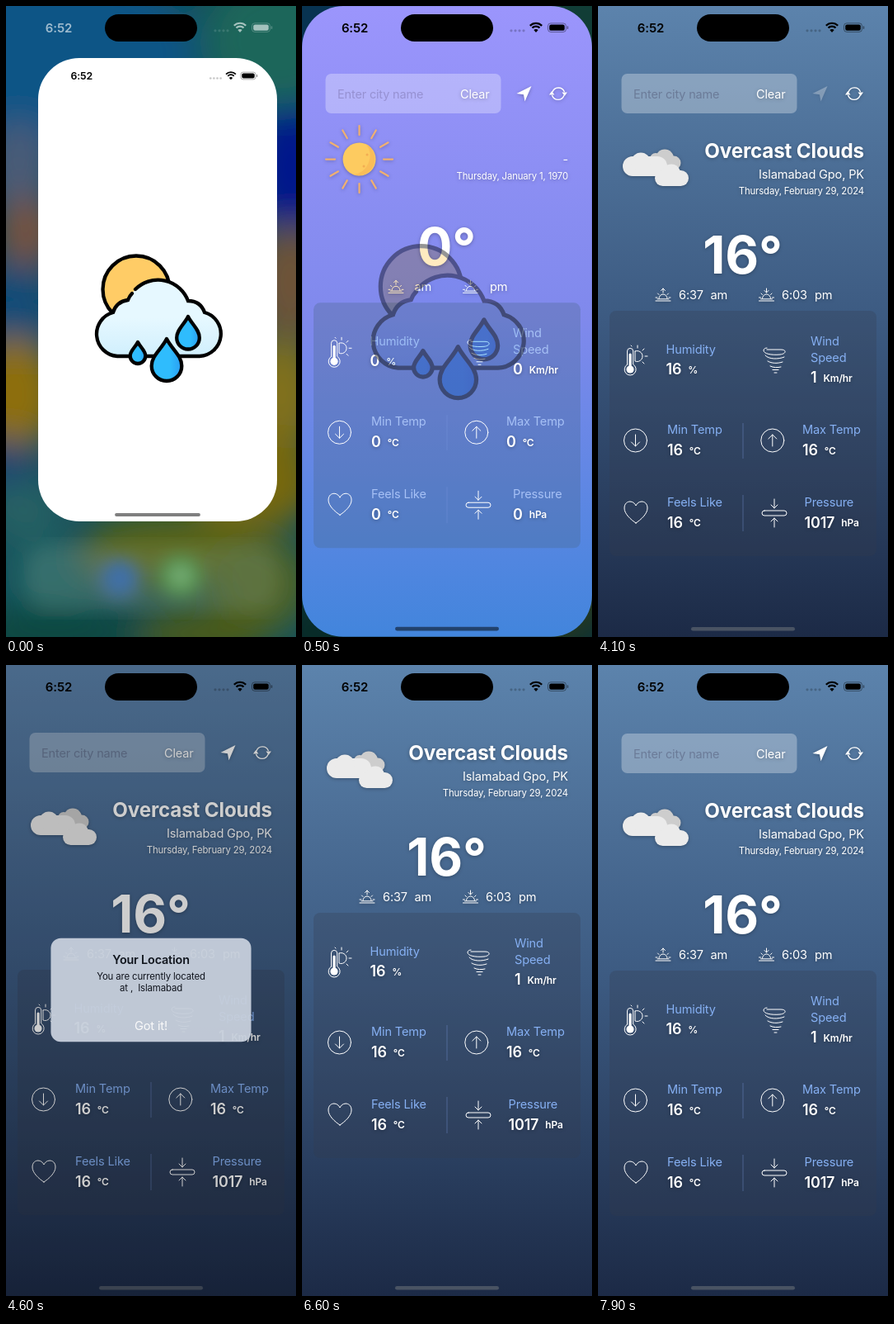
An HTML page that plays this animation: 352 px wide and 764 px high, repeating every 8000 ms.

```html
<!DOCTYPE html>
<html lang="en">
<head>
<meta charset="utf-8">
<title>Weather app</title>
<style>
html, body { margin: 0; height: 100%; overflow: hidden; background: #104850; }
svg { display: block; width: 100vw; height: 100vh; font-family: Inter, Roboto, sans-serif; letter-spacing: -.01em; }
text { white-space: pre; }
.line { fill: none; stroke: #fff; stroke-width: 1; stroke-linecap: round; stroke-linejoin: round; }
.shade { filter: drop-shadow(0 1.5px 2px rgba(0, 0, 0, .28)); }
#splash { mix-blend-mode: multiply; }
</style>
</head>
<body>
<svg id="stage" viewBox="0 0 352 764"></svg>
<script>
const stage = document.getElementById('stage');

const text = (x, y, size, str, { w = 400, fill = '#fff', at = 'start' } = {}) =>
  `<text x="${x}" y="${y}" font-size="${size}" font-weight="${w}" fill="${fill}" text-anchor="${at}">${str}</text>`;
const rect = (x, y, w, h, r, fill, more = '') =>
  `<rect x="${x}" y="${y}" width="${w}" height="${h}" rx="${r}" fill="${fill}" ${more}/>`;
const circle = (x, y, r, fill, more = '') => `<circle cx="${x}" cy="${y}" r="${r}" fill="${fill}" ${more}/>`;
const path = (d, more = 'class="line"') => `<path d="${d}" ${more}/>`;
const group = (more, ...parts) => `<g ${more}>${parts.join('')}</g>`;
const gradient = (id, ...stops) => `<linearGradient id="${id}" x2="0" y2="1">${stops.map((c, i) =>
  `<stop offset="${i / (stops.length - 1)}" stop-color="${c}"/>`).join('')}</linearGradient>`;

function wallpaper() {
  const blobs = [
    [60, 60, 170, 110, '#075486'], [330, 40, 90, 80, '#1c665a'], [345, 195, 45, 75, '#04148c'],
    [345, 335, 50, 70, '#6d5238'], [15, 195, 40, 55, '#4b5b78'], [25, 275, 35, 45, '#7a5340'],
    [10, 370, 45, 60, '#0c4c78'], [10, 470, 55, 70, '#8d6e0c'], [335, 470, 50, 70, '#80701c'],
    [0, 560, 35, 35, '#153f75'], [20, 610, 50, 40, '#266064'], [300, 575, 80, 60, '#77680f'],
    [60, 690, 60, 45, '#1d5f60'], [200, 660, 110, 45, '#596317'], [310, 700, 60, 60, '#4f6328'],
    [60, 760, 130, 35, '#0c4740'], [240, 760, 80, 30, '#4b5a18']
  ];
  return rect(0, 0, 352, 764, 0, '#124f5c') +
    group('filter="url(#blur)"', ...blobs.map(([x, y, rx, ry, c]) =>
      `<ellipse cx="${x}" cy="${y}" rx="${rx}" ry="${ry}" fill="${c}"/>`)) +
    group('filter="url(#soft)"', rect(24, 652, 306, 82, 30, '#8fa89a', 'opacity=".22"'),
      circle(138, 693, 24, '#3f70a8'), circle(212, 690, 25, '#4f9a50'), circle(212, 690, 10, '#8fb88c'));
}

function statusBar(color) {
  const arc = r => `M${284 - r * .72} ${31 - r * .72}A${r} ${r} 0 0 1 ${284 + r * .72} ${31 - r * .72}`;
  return text(64, 31.5, 15, '6:52', { w: 600, fill: color, at: 'middle' }) +
    [254, 259, 264, 269].map(x => circle(x, 29.8, 1.6, color, 'opacity=".22"')).join('') +
    path(arc(10) + arc(6.3), `fill="none" stroke="${color}" stroke-width="2.2"`) +
    path('M284 32L281.3 29Q284 27 286.7 29Z', `fill="${color}"`) +
    rect(298.5, 20.8, 22, 10.6, 3.4, 'none', `stroke="${color}" stroke-opacity=".4"`) +
    rect(300.2, 22.4, 18.6, 7.4, 2.2, color) + rect(321.8, 24.3, 1.4, 3.6, .7, color, 'opacity=".45"');
}

function drop(x, y, r, h) {
  const d = `M0 0C${r * .35} ${h * .25} ${r} ${h * .4} ${r} ${h - r}A${r} ${r} 0 0 1 ${-r} ${h - r}` +
    `C${-r} ${h * .4} ${-r * .35} ${h * .25} 0 0Z`;
  return path(d, `transform="translate(${x} ${y})" fill="url(#water)" stroke="#000" stroke-width="4.3" stroke-linejoin="round"`);
}

function splashIcon() {
  const ink = 'stroke="#000" stroke-width="4.3" stroke-linecap="round"';
  const left = 'M135 424A27 27 0 0 1 130 371Q134 358 148 356Q150 351 153 348';
  const right = '157 343A39 39 0 0 1 221 357Q236 357 241 371A27 27 0 0 1 235 424';
  return circle(158, 343, 40.5, '#ffcc66', ink) +
    path(`${left}L${right}Z`, 'fill="url(#cloud)"') +
    path(`${left}M${right}H135`, `fill="none" ${ink}`) +
    drop(160, 407, 9.3, 26) + drop(221, 376, 13.8, 39.5) + drop(195, 403, 18.3, 51);
}

const sunIcon = () => {
  const rays = Array.from({ length: 12 }, (_, i) =>
    path('M99 185.5H110', `stroke="#f0b070" stroke-width="2.2" stroke-linecap="round" transform="rotate(${i * 30} 69.5 185.5)"`));
  return rays.join('') + circle(69.5, 185.5, 20, '#fdcb60') +
    path('M78 167.5A20 20 0 0 1 62 204A23 23 0 0 0 78 167.5', 'fill="#f9bd58"') +
    circle(79, 180, 1.5, '#f3ad52') + circle(75, 194, 1.5, '#f3ad52');
};

const cloudIcon = () =>
  group('fill="#cdcdcd"', circle(81, 184.5, 11), circle(92, 190, 8.5), circle(70, 185, 7)).replace(/fill="undefined"/g, '') +
  rect(30, 182, 54, 24, 12, '#ebebeb') + circle(52, 189, 11.5, '#ebebeb') +
  rect(69, 199, 41, 19, 9.5, '#ebebeb') + circle(89, 202.5, 11, '#ebebeb');

// Half sun on a horizon, with an arrow going up or down
const horizon = (x, y, up) => group(`transform="translate(${x} ${y})"`,
  path(`M-9 7H9M-5 4A5 5 0 0 1 5 4M-9 3H-7M9 3H7M-6.5 -2L-5 -.5M6.5 -2L5 -.5M-7 4.8H7M0 -8V-3` +
    (up ? 'M-2.5 -5.5L0 -8L2.5 -5.5' : 'M-2.5 -5.5L0 -3L2.5 -5.5')));

const ringArrow = (x, down) => circle(x, 526, 14, 'none', 'class="line"') +
  path(down ? `M${x} 519V533M${x - 5} 528L${x} 533L${x + 5} 528` : `M${x} 533V519M${x - 5} 524L${x} 519L${x + 5} 524`);

const thermometer = () =>
  path('M35.5 434V418A3.6 3.6 0 0 1 42.7 418V434A7 7 0 1 1 35.5 434Z') +
  circle(39, 440, 4.6, '#fff') + path('M39.1 422V438', 'stroke="#fff" stroke-width="3.2" stroke-linecap="round"') +
  path('M45 418A6.5 6.5 0 1 1 45 430V418M48 411V414M56 415L54 417M60 424H57M56 433L54 431M40 411L41 412');

const tornado = () =>
  path('M205 416H222C229 416 229 421 221 422C210 423 201 421 201 417C201 415 203 414 205 414' +
    'M203 423C207 428 219 428 226 425M206 430C211 433 218 433 224 431M209 436C213 438 218 438 222 437M212 440.5H219M214 444H217');

const reading = (x, y, value, unit) =>
  `<text x="${x}" y="${y}" font-size="18" font-weight="600" fill="#fff">${value}<tspan dx="8" dy="-1.5" font-size="12">${unit}</tspan></text>`;

function page(s) {
  const label = (x, y, str) => text(x, y, 14.6, str, { fill: s.tint });
  const end = { at: 'end' };
  return rect(28.5, 82, 213, 48, 7, '#fff', 'opacity=".3"') +
    text(43, 112, 14.5, 'Enter city name', { fill: s.hint }) +
    group('class="shade"',
      text(192, 112, 14.5, 'Clear'),
      path('M278.5 97L270.5 115.5L269 107.3L260.5 106Z', 'class="pin" fill="#fff"'),
      path('M304 104A7.7 7.7 0 0 1 318.3 103.5M318 108.5A7.7 7.7 0 0 1 303.7 108.5', 'class="line" style="stroke-width:1.4"'),
      path('M315.5 104.5H322L318.8 109ZM300 107.5H306.5L303.2 103Z', 'fill="#fff"'),
      s.icon,
      text(323, 183.5, 24.2, s.title, { w: 700, at: 'end' }),
      text(323, s.placeY, 14.6, s.place, end),
      text(323, s.placeY + 19, 11.4, s.date, end)) +
    group(`transform="translate(0 ${s.dy})"`,
      rect(14, 369, 324, 297, 8, s.panel),
      group('class="shade"',
        text(175.5, 324, 63, s.temp + '°', { w: 700, at: 'middle' }),
        horizon(s.riseX, 350, true), horizon(204.5, 350, false),
        text(98, 354.5, 14.6, s.rise), text(136.5, 354.5, 14.6, 'am'),
        text(223, 354.5, 14.6, s.set), text(s.pmX, 354.5, 14.6, 'pm')),
      path('M176 505V548M176 592V636', 'stroke="#7d9be0" stroke-opacity=".4"'),
      thermometer(), tornado(), ringArrow(45.5, true), ringArrow(211.8, false),
      path('M46 626C40 622 32 615 32 608C32 602 36 600 39 600C43 600 45 603 46 605C47 603 49 600 53 600C56 600 60 602 60 608C60 615 52 622 46 626Z'),
      rect(199, 611, 30, 6, 3, 'none', 'class="line"'),
      path('M214 597V608M210 604L214 608L218 604M214 631V620M210 624L214 620L218 624'),
      label(82.5, 420.5, 'Humidity'), label(s.windX, 411, 'Wind'), label(s.windX, 430.5, 'Speed'),
      label(84, 518, 'Min Temp'), label(248, 518, 'Max Temp'),
      label(84, 606, 'Feels Like'), label(s.pressX, 606, 'Pressure'),
      group('class="shade"',
        reading(82.5, 446, s.humidity, '%'), reading(s.windX, 456, s.wind, 'Km/hr'),
        reading(84, 544, s.temp, '°C'), reading(248, 544, s.temp, '°C'),
        reading(84, 631.5, s.temp, '°C'), reading(s.pressX, 631.5, s.pressure, 'hPa')));
}

const emptyPage = page({
  tint: '#a6c0f5', hint: '#9691d2', panel: 'rgba(70,100,130,.3)', icon: sunIcon(), title: '', place: '-', placeY: 191,
  date: 'Thursday, January 1, 1970', dy: -9.7, temp: 0, riseX: 114, rise: '', set: '', pmX: 228,
  humidity: 0, wind: 0, windX: 256, pressX: 256, pressure: 0
});
const loadedPage = page({
  tint: '#86b0f3', hint: '#6b7b98', panel: 'rgba(50,57,78,.28)', icon: cloudIcon(), title: 'Overcast Clouds',
  place: 'Islamabad Gpo, PK', placeY: 209, date: 'Thursday, February 29, 2024', dy: 0, temp: 16,
  riseX: 79, rise: '6:37', set: '6:03', pmX: 263, humidity: 16, wind: 1, windX: 258, pressX: 250.5, pressure: 1017
});

const dark = { fill: '#10141c', at: 'middle' };
stage.innerHTML = `<defs>
  ${gradient('clearSky', '#9b95fc', '#7f89ec', '#4285dc')}
  ${gradient('greySky', '#5c83ac', '#3c5a81', '#1c2a46')}
  ${gradient('cloud', '#e6f8ff', '#e6f8ff', '#d0effd')}
  <linearGradient id="water"><stop offset=".6" stop-color="#2fbcfd"/><stop offset="1" stop-color="#2a9df2"/></linearGradient>
  <filter id="blur" x="-30%" y="-30%" width="160%" height="160%"><feGaussianBlur stdDeviation="20"/></filter>
  <filter id="soft"><feGaussianBlur stdDeviation="11"/></filter>
  <clipPath id="frame"><rect id="frameRect"/></clipPath>
  <clipPath id="safe"><rect y="62" width="352" height="702"/></clipPath>
</defs>` +
  group('id="home"', wallpaper(), rect(0, 0, 352, 764, 0, '#000', 'id="homeDim"'),
    group('id="outerBar"', statusBar('#fff'))) +
  group('clip-path="url(#frame)"', group('id="app"',
    rect(0, 0, 352, 764, 0, 'url(#clearSky)'), rect(0, 0, 352, 764, 0, 'url(#greySky)', 'id="grey"'),
    group('id="empty"', emptyPage),
    group('clip-path="url(#safe)"', group('id="loaded"', loadedPage)),
    rect(0, 0, 352, 764, 0, '#fff', 'id="white"'),
    group('id="splash" transform="scale(1.2138) translate(-39 -63)"', splashIcon()),
    rect(113, 0, 126, 4.6, 2.3, '#000', 'id="bar"'),
    rect(0, 0, 352, 764, 0, '#000', 'id="dim"'),
    group('id="alert"',
      rect(55, 331, 242, 125, 12, '#c9d1dd', 'opacity=".97"'),
      text(176, 362, 14.3, 'Your Location', { ...dark, w: 600 }),
      text(176, 381, 11.4, 'You are currently located', dark),
      text(176, 395, 11.4, 'at ,\u00a0 Islamabad', dark),
      text(176, 442, 14.6, 'Got it!', { at: 'middle' })),
    statusBar('#000'))) +
  rect(120, 10, 112, 33, 16.5, '#000');

const clamp = v => Math.min(1, Math.max(0, v));
const ramp = (t, from, to) => clamp((t - from) / (to - from));
const smooth = v => v * v * (3 - 2 * v);
const set = (id, attrs) => {
  const el = document.getElementById(id);
  for (const key in attrs) el.setAttribute(key, attrs[key]);
};

// Drag up, pull down past the top, then a critically damped bounce
function scrollAt(t) {
  if (t < 6600) return -69 * Math.sin(ramp(t, 6400, 6600) * Math.PI / 2);
  if (t < 7300) return -69 + 145 * smooth(ramp(t, 6600, 7300));
  const u = (t - 7300) / 95;
  return 76 * (1 + u) * Math.exp(-u);
}

function draw(t) {
  const open = t < 700 ? 1 - Math.exp(-t / 75) : 1;
  const x = 39 * (1 - open), y = 63 * (1 - open);
  const width = 290 + 62 * open, height = 561 + 203 * open, scale = width / 352;
  set('frameRect', { x, y, width, height, rx: t < 800 ? 50 : 0 });
  set('app', { transform: `translate(${x} ${y}) scale(${scale})` });
  set('outerBar', { opacity: .6 * (1 - ramp(t, 0, 200)) });
  set('homeDim', { opacity: .4 * open });
  set('home', { display: t < 900 ? 'inline' : 'none' });

  const ready = t >= 1100;
  set('empty', { display: ready ? 'none' : 'inline' });
  set('loaded', { display: ready ? 'inline' : 'none', transform: `translate(0 ${scrollAt(t)})` });
  set('grey', { opacity: ramp(t, 1000, 1200) });
  set('white', { opacity: 1 - ramp(t, 150, 500) });
  set('splash', { opacity: 1 - ramp(t, 150, 750) });
  set('bar', { y: height / scale - 12, fill: ready ? '#59606c' : '#000', opacity: ready ? .75 : .5 });

  const show = t < 5000 ? 1 - (1 - ramp(t, 4150, 4800)) ** 3 : 1 - smooth(ramp(t, 5200, 5850));
  const zoom = t < 5000 ? 1.16 - .16 * show : 1;
  set('dim', { opacity: .2 * show });
  set('alert', { opacity: show, transform: `translate(176 393.5) scale(${zoom}) translate(-176 -393.5)` });
  document.querySelectorAll('.pin').forEach(pin =>
    pin.setAttribute('opacity', t >= 4100 && t < 4500 ? .3 + .7 * ramp(t, 4100, 4500) : 1));
}

function tick() {
  draw(Math.floor(performance.now() % 8000 / 100) * 100);
  requestAnimationFrame(tick);
}
tick();
</script>
</body>
</html>
```
